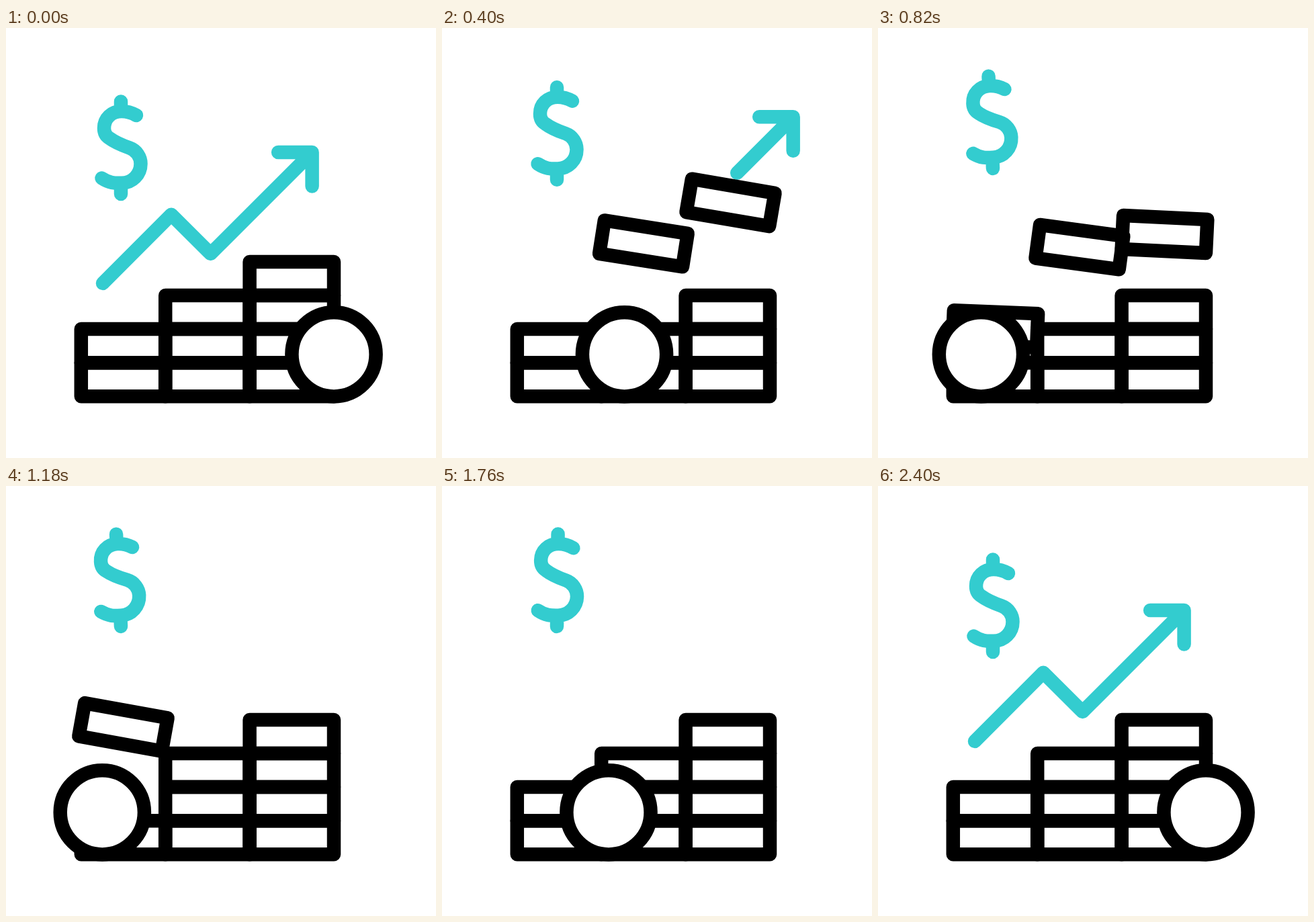
An HTML page with a canvas that plays this animation: 640 by 640 pixels, repeating every 2620 ms.

```html
<!DOCTYPE html>
<html lang="en">
<head>
<meta charset="utf-8">
<title>Growing savings</title>
<style>
  html, body { margin: 0; width: 100%; height: 100%; overflow: hidden; background: #fff; }
  canvas { display: block; width: 640px; height: 640px; }
</style>
</head>
<body>
<canvas id="stage" width="640" height="640"></canvas>
<script>
const ctx = document.getElementById('stage').getContext('2d');
const LOOP = 2620, STEP = 20, LAST = 2400;
const TEAL = '#33cccf', BLACK = '#000';
const BLOCK_W = 125.4, BLOCK_H = 50.1, FLOOR = 548.3;

// Stacks; the top block of each hops: times, height, tilt in degrees, pivot below its centre
const stacks = [
  { x: 111.8, rows: 2, rise: 690, top: 1120, drop: 1120, land: 1620, lift: 116, tilt: 10.6, pivot: 0 },
  { x: 237.2, rows: 3, rise: 40, top: 420, drop: 740, land: 1070, lift: 103, tilt: 9, pivot: 0 },
  { x: 362.6, rows: 4, rise: 20, top: 380, drop: 380, land: 1060, lift: 113.5, tilt: 9.7, pivot: 25 }
];
const swing = [[740, 0], [1000, -12], [1430, 12], [1815, 0]];

const sign = new Path2D(
  'M171 109.5V122M194 130C187 126 179.5 124 172 124C157 124 146 134.5 146 149' +
  'C146 155.5 149 161 154 164C162 170 174 175 184 178.5C194 182 200.5 192 200.5 202' +
  'C200.5 218 188 230.7 172 230.7C161 231 154 231 142.5 223.5M171 234V247');

const span = (t, a, b) => Math.min(1, Math.max(0, (t - a) / (b - a)));
const smooth = u => u * u * (3 - 2 * u);
const mix = (a, b, u) => a + (b - a) * u;
const rad = deg => deg * Math.PI / 180;

// cubic-bezier(x1, 0, x2, 1)
function bezier(u, x1, x2) {
  let lo = 0, hi = 1;
  for (let i = 0; i < 24; i++) {
    const s = (lo + hi) / 2, r = 1 - s;
    if (3 * r * r * s * x1 + 3 * r * s * s * x2 + s * s * s < u) lo = s; else hi = s;
  }
  return smooth(lo);
}

function track(keys, t) {
  let value = keys[0][1];
  for (let i = 1; i < keys.length; i++) {
    const [t0, v0] = keys[i - 1], [t1, v1] = keys[i];
    if (t >= t0) value = mix(v0, v1, smooth(span(t, t0, t1)));
  }
  return value;
}

function drawStack(s, t) {
  for (let row = 1; row <= s.rows; row++) {
    let lift = 0, tilt = 0;
    if (row === s.rows) {
      const up = smooth(span(t, s.rise, s.top));
      const down = span(t, s.drop, s.land);
      lift = s.lift * up * (1 - down * down);
      tilt = s.tilt * up * (1 - smooth(down));
    }
    ctx.save();
    ctx.translate(s.x + BLOCK_W / 2, FLOOR - (row - 0.5) * BLOCK_H + s.pivot - lift);
    ctx.rotate(rad(tilt));
    ctx.strokeRect(-BLOCK_W / 2, -BLOCK_H / 2 - s.pivot, BLOCK_W, BLOCK_H);
    ctx.restore();
  }
}

function drawCoin(t) {
  const x = 488 - 345 * (bezier(span(t, 0, 1060), 0.333, 0.178) - bezier(span(t, 1134, 2094), 0.95, 0.72));
  ctx.beginPath();
  ctx.arc(x, 485.8, 62.6, 0, 2 * Math.PI);
  ctx.fill();
  ctx.stroke();
}

// The zigzag always advances in x, so y follows from x
const PEAK = 246, VALLEY = 304.5;
const zigzag = x => x < PEAK ? 524 - x : x < VALLEY ? x + 31.8 : 640.6 - x;

function drawArrow(t) {
  let tail = 144, tip = 455.6, drift = 0;
  if (t < 660) {
    const go = Math.max(0, t - 200) / 340;
    tail += 0.036 * Math.pow(t, 1.5);
    tip += 173 * go * go;
    drift = 7.2 * Math.min(1, t / 400) ** 2;
  } else if (t > 1860) {
    tip = mix(144, tip, span(t, 1860, 2395));
  } else return;

  const y = zigzag(tip), arm = 50.5;
  const back = tip > PEAK && tip < VALLEY ? -arm : arm;
  ctx.save();
  ctx.translate(drift, drift);
  ctx.beginPath();
  ctx.moveTo(tail, zigzag(tail));
  for (const x of [PEAK, VALLEY]) if (x > tail && x < tip) ctx.lineTo(x, zigzag(x));
  ctx.lineTo(tip, y);
  ctx.moveTo(tip - arm, y);
  ctx.lineTo(tip, y);
  ctx.lineTo(tip, y + back);
  ctx.stroke();
  ctx.restore();
}

function drawSign(t) {
  const lift = 38 * (smooth(span(t, 0, 740)) - smooth(span(t, 2080, 2388)));
  ctx.save();
  ctx.translate(171, 247 - lift);
  ctx.rotate(rad(track(swing, t)));
  ctx.translate(-171, -247);
  ctx.stroke(sign);
  ctx.restore();
}

function draw(t) {
  ctx.fillStyle = '#fff';
  ctx.fillRect(0, 0, 640, 640);
  ctx.lineWidth = 20.5;
  ctx.lineCap = ctx.lineJoin = 'round';
  ctx.strokeStyle = TEAL;
  drawSign(t);
  drawArrow(t);
  ctx.strokeStyle = BLACK;
  stacks.forEach(s => drawStack(s, t));
  drawCoin(t);
}

const start = performance.now();
function tick() {
  const t = (performance.now() - start) % LOOP;
  draw(Math.min(LAST, Math.floor(t / STEP) * STEP));
  requestAnimationFrame(tick);
}
tick();
</script>
</body>
</html>
```
